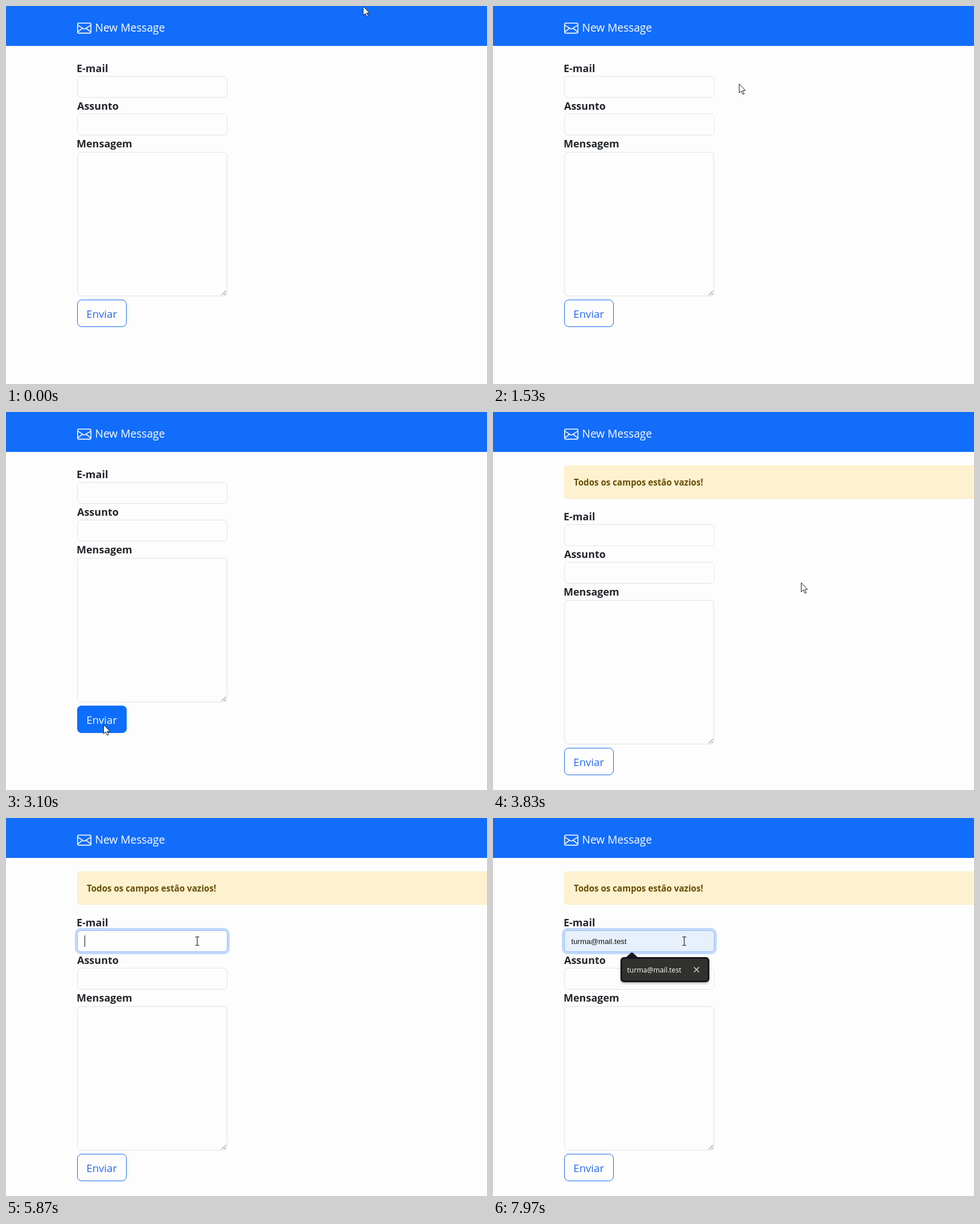
These frames come from a looping animation (845x663 px, 8 s). An HTML page:

```html
<!DOCTYPE html>
<html lang="pt">
<head>
<meta charset="utf-8">
<title>New Message</title>
<style>
  html, body { margin: 0; width: 100%; height: 100%; overflow: hidden; background: #fdfdfd; }
  svg { display: block; width: 845px; height: 663px; font-family: "Open Sans", "Noto Sans", sans-serif; }
  .label { font-size: 18px; font-weight: 700; fill: #212529; }
  .field { fill: #fdfdfd; stroke: #dfe2e4; }
  .warning { font-size: 15.15px; font-weight: 700; fill: #664d03; }
  .preview { font: 13.33px "Liberation Sans", Arial, sans-serif; fill: #111; }
</style>
</head>
<body>
<svg viewBox="0 0 845 663">
  <defs>
    <filter id="shadow" x="-10%" y="-20%" width="120%" height="150%">
      <feDropShadow dx="0" dy="2" stdDeviation="2" flood-opacity=".3"/>
    </filter>
  </defs>

  <rect width="845" height="663" fill="#fdfdfd"/>
  <rect width="845" height="70" fill="#126dfb"/>
  <g fill="none" stroke="#fff" stroke-width="1.6">
    <rect x="125.8" y="30" width="23.4" height="17.6" rx="2.4"/>
    <path d="M126 33.6L137.5 40.6L149 33.6M126 45.6L134.4 39M149 45.6L140.6 39"/>
  </g>
  <text x="156.5" y="45" font-size="19.15" fill="#fff">New Message</text>

  <g id="alert">
    <rect x="125.5" y="94.5" width="740" height="57" rx="5" fill="#fdf1cf" stroke="#fbe8b8"/>
    <text class="warning" x="142" y="129">Todos os campos estão vazios!</text>
  </g>

  <g id="form">
    <text class="label" x="124" y="115.5">E-mail</text>
    <rect class="field" x="125.5" y="123.5" width="263" height="37" rx="6"/>
    <text class="label" x="125" y="182">Assunto</text>
    <rect class="field" x="125.5" y="189.5" width="263" height="37" rx="6"/>
    <text class="label" x="124" y="248">Mensagem</text>
    <rect class="field" x="125.5" y="256.5" width="262.5" height="252" rx="6"/>
    <path d="M379 507L386.5 499.5M383.5 507L386.5 504" stroke="#666" fill="none"/>
    <rect x="125.5" y="515.5" width="86" height="47" rx="7.5" fill="none" stroke="#1a6cec"/>
    <rect id="buttonFill" x="125" y="515" width="87" height="48" rx="8" fill="#0d6efd"/>
    <text id="buttonText" x="141.3" y="547" font-size="18.6" fill="#2a68f0">Enviar</text>
  </g>

  <g id="focus">
    <rect x="123" y="195" width="268" height="42" rx="8" fill="none" stroke="#c2d9fc" stroke-width="4"/>
    <rect id="focusFill" x="125.5" y="197.5" width="263" height="37" rx="6" stroke="#8fbcfa"/>
  </g>
  <text id="typed" x="137.5" y="221.5" font-size="15.2" fill="#212529">t</text>
  <rect id="caret" y="206" width="1" height="20" fill="#111"/>
  <text id="preview" class="preview" x="137.5" y="221">turma@mail.test</text>

  <g id="popup">
    <path filter="url(#shadow)" fill="#18181c"
      d="M230 244H234L242.5 236.5Q244 235 245.5 236.5L254 244H374a6 6 0 0 1 6 6V282a6 6 0 0 1-6 6H230a6 6 0 0 1-6-6V250a6 6 0 0 1 6-6Z"/>
    <rect id="popupHover" x="227" y="247" width="150" height="38" rx="3" fill="#31312f"/>
    <text x="235.5" y="270.5" font-size="12.3" fill="#fff">turma@mail.test</text>
    <path id="popupClose" d="M353 261.5L362 270.5M362 261.5L353 270.5" stroke="#dcdcdc" stroke-width="1.4"/>
  </g>

  <path id="arrow" d="M.5 .5V16.5L4.2 13L7 19L9.3 18L6.7 12.2H11.5Z" fill="#fff" stroke="#1c1c28"/>
  <path id="beam" d="M-3.5 -7.5H-1L0 -6.5L1 -7.5H3.5M0 -6.5V6.5M-3.5 7.5H-1L0 6.5L1 7.5H3.5"
    fill="none" stroke="#222" stroke-width="1.2"/>
</svg>

<script>
const LOOP = 8000;
const TIMES = { hover: 2430, submit: 3170, beam: 5400, focus: 5650, type: 6330, suggest: 6420, choose: 7650 };

// time, x, y of the pointer
const PATH = [
  [0, 627, 0], [800, 560, 96], [1480, 432, 136], [1650, 432, 136],
  [2480, 172, 556], [2750, 171, 548], [3190, 171, 548],
  [3480, 740, 262], [3830, 541, 299], [4300, 500, 296],
  [4950, 465, 270], [5330, 341, 201], [5520, 336, 216], [LOOP, 336, 216]
];

const parts = {};
for (const node of document.querySelectorAll("svg [id]")) parts[node.id] = node;

const clamp = v => Math.min(1, Math.max(0, v));
const ease = v => v * v * (3 - 2 * v);
const fade = (t, start) => ease(clamp((t - start) / 150));
const show = (id, on) => { parts[id].style.opacity = Number(on); };
const place = (id, x, y) => parts[id].setAttribute("transform", `translate(${x} ${y})`);

function pointerAt(t) {
  const i = PATH.findIndex(step => step[0] > t);
  const [t0, x0, y0] = PATH[i - 1];
  const [t1, x1, y1] = PATH[i];
  const k = ease((t - t0) / (t1 - t0));
  return [Math.round(x0 + (x1 - x0) * k), Math.round(y0 + (y1 - y0) * k)];
}

function draw(t) {
  const submitted = t >= TIMES.submit;
  const typed = t >= TIMES.type;
  const chosen = t >= TIMES.choose;
  const hover = submitted ? 1 - fade(t, TIMES.submit) : fade(t, TIMES.hover);

  show("alert", submitted);
  place("form", 0, submitted ? 74 : 0);
  show("buttonFill", hover);
  parts.buttonText.style.fill = hover > .5 ? "#fff" : "#2a68f0";

  show("focus", fade(t, TIMES.focus));
  parts.focusFill.style.fill = chosen ? "#e7f0fb" : "#fdfdfd";
  show("typed", typed && !chosen);
  show("preview", chosen);
  const blinkStart = typed ? TIMES.type : TIMES.focus;
  const caretOn = t >= TIMES.focus && !chosen && (t - blinkStart) % 1000 < 500;
  show("caret", caretOn);
  parts.caret.setAttribute("x", typed ? 143 : 138);

  show("popup", t >= TIMES.suggest);
  show("popupHover", chosen);
  show("popupClose", chosen);

  const beam = t >= TIMES.beam;
  const [x, y] = pointerAt(t);
  show("arrow", !beam);
  show("beam", beam);
  place("arrow", x, y);
  place("beam", x, y);
}

const start = performance.now();
function tick() {
  draw((performance.now() - start) % LOOP);
  requestAnimationFrame(tick);
}
tick();
</script>
</body>
</html>
```
